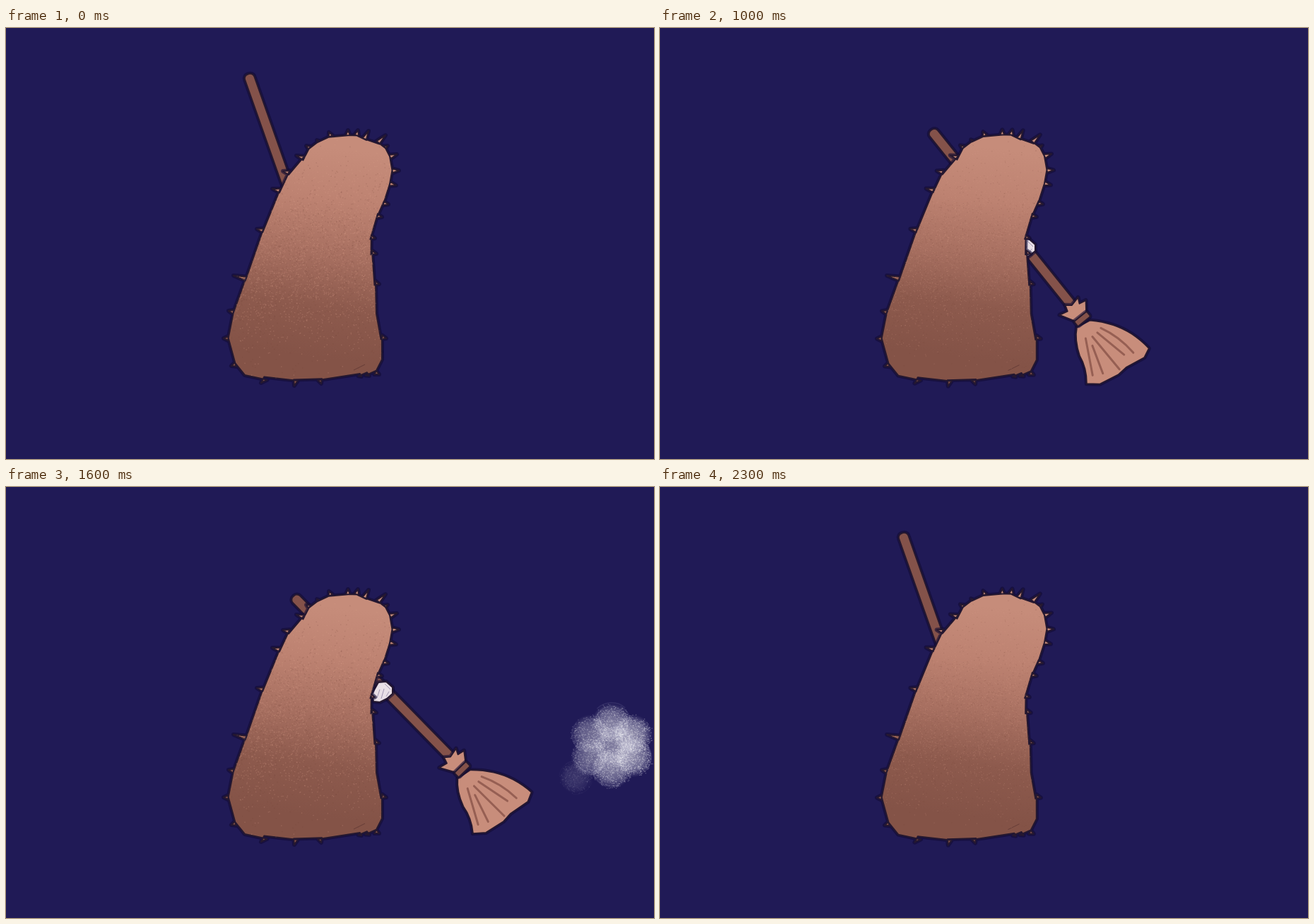
An HTML page with a canvas for the animation above (2.4 s loop, 917 by 611 pixels).

```html
<!DOCTYPE html>
<html lang="en">
<head>
<meta charset="utf-8">
<title>Sweeping broom</title>
<style>
html, body { margin: 0; width: 100%; height: 100%; overflow: hidden; background: #201a56; }
canvas { display: block; width: 100%; height: 100%; }
</style>
</head>
<body>
<canvas id="stage" width="917" height="611"></canvas>
<script>
const ctx = document.getElementById('stage').getContext('2d');
const LOOP = 2400, INK = '#25182f', HALO = 'rgba(18,11,52,.6)', WOOD = '#84524a', STRAW = '#c88d7b';

// Tufts clockwise around the fur: tip x, tip y, depth.
const tufts = [
  [392, 203, 9], [411, 181, 11], [425, 167, 5], [440, 159, 3], [457, 148, 6], [484, 145, 7],
  [498, 145, 7], [513, 146, 13], [537, 152, 15], [540, 167, 4], [553, 179, 10], [556, 202, 9],
  [552, 223, 9], [541, 250, 7], [532, 268, 7], [522, 298, 6], [524, 320, 7], [528, 363, 6],
  [524, 405, 0], [538, 440, 7], [532, 470, 0], [528, 491, 6], [514, 493, 5], [503, 494, 4],
  [446, 504, 6], [408, 507, 8], [361, 503, 9], [338, 492, 0], [319, 479, 6], [308, 440, 6],
  [315, 401, 7], [322, 351, 18], [355, 285, 9], [377, 228, 11]
];

// Each tuft is a thin wedge pointing away from the spine of the body.
function furOutline() {
  const path = new Path2D(), topX = 483, topY = 205, spineX = -58, spineY = 235;
  for (const [x, y, depth] of tufts) {
    const along = ((x - topX) * spineX + (y - topY) * spineY) / (spineX ** 2 + spineY ** 2);
    const part = Math.min(1, Math.max(0, along));
    const dx = topX + part * spineX - x, dy = topY + part * spineY - y;
    const length = Math.hypot(dx, dy), ux = dx / length, uy = dy / length;
    const baseX = x + ux * depth, baseY = y + uy * depth, half = Math.min(3, depth / 2);
    path.lineTo(baseX + uy * half, baseY - ux * half);
    path.lineTo(x, y);
    path.lineTo(baseX - uy * half, baseY + ux * half);
  }
  path.closePath();
  return path;
}
const bodyPath = furOutline();

// Broom parts, with the binding at 0,0 and the handle along the negative x axis.
const brush = new Path2D('M10 -7Q34 -32 62 -41Q78 -46 93 -47L99 -34L94 -5L95 10L89 39L77 53Q60 39 40 36Q18 28 6 14Z');
const collar = new Path2D('M0 9L-23 22L-20 10L-29 7L-23 0L-26 -14L-18 -10L-16 -20L0 -8Z');
const ribs = new Path2D('M28 -12Q54 -25 84 -26M30 -4L78 -14M30 5L90 4M40 13L80 26M26 14L73 39');

// Every pose: binding x, y, angle in degrees, and the hand when it shows.
const rest = [456, 387, 70.6], lift = [495, 404, 65], reach = [539, 411, 59.1],
  push = [597, 411, 51.3, 518, 313], sweep = [645, 399, 45.7, 534, 290],
  fling = [683, 374, 36.9, 540, 272];
const poses = [rest, rest, rest, lift, reach, push, sweep, fling, sweep, push, lift, rest];

// Dust cloud: time, center x, y, ring radii, opacity, lean of the dense side to the right.
const dust = [
  [1100, 690, 477, 9, 6, .4, 0],
  [1200, 738, 468, 27, 16, .85, -.45],
  [1400, 815, 393, 42, 38, .85, 0],
  [1600, 857, 367, 34, 32, .6, .2],
  [1800, 862, 342, 20, 22, .5, .75],
  [2300, 875, 325, 8, 8, 0, .7]
];

function randomFrom(seed) {
  return () => {
    seed = seed + 0x6D2B79F5 | 0;
    let n = Math.imul(seed ^ seed >>> 15, 1 | seed);
    n = n + Math.imul(n ^ n >>> 7, 61 | n) ^ n;
    return ((n ^ n >>> 14) >>> 0) / 4294967296;
  };
}

function inked(path, fill) {
  ctx.lineJoin = 'round';
  ctx.strokeStyle = HALO;
  ctx.lineWidth = 6;
  ctx.stroke(path);
  ctx.fillStyle = fill;
  ctx.fill(path);
  ctx.strokeStyle = INK;
  ctx.lineWidth = 2;
  ctx.stroke(path);
}

function drawBody(alternate) {
  const random = randomFrom(alternate ? 31 : 7);
  ctx.save();
  if (alternate) {
    ctx.translate(431, 325);
    ctx.scale(1.008, 1.004);
    ctx.translate(-431, -325);
  }
  const fur = ctx.createLinearGradient(462, 170, 425, 465);
  ['#c68c7a', '#bd8271', '#a87061', '#8d5a4d', '#845347'].forEach((color, i) => fur.addColorStop(i / 4, color));
  inked(bodyPath, fur);
  ctx.clip(bodyPath);
  const size = alternate ? 1.1 : 1.4;
  for (let i = 0; i < 4200; i++) {
    const x = 310 + random() * 240;
    const y = 325 + (random() + random() + random() - 1.5) * 125;
    ctx.fillStyle = random() < .6 ? 'rgba(222,164,143,.24)' : 'rgba(112,66,57,.18)';
    ctx.fillRect(x, y, size, size);
  }
  ctx.strokeStyle = 'rgba(80,45,45,.6)';
  ctx.lineWidth = 1;
  ctx.stroke(new Path2D('M492 485L508 477'));
  ctx.restore();
}

function drawBroom([x, y, degrees]) {
  ctx.save();
  ctx.translate(x, y);
  ctx.rotate(degrees * Math.PI / 180);
  const handle = new Path2D();
  handle.roundRect(-341, -7, 325, 14, 6);
  inked(handle, WOOD);
  inked(brush, STRAW);
  ctx.strokeStyle = '#965f53';
  ctx.lineWidth = 3;
  ctx.lineCap = 'round';
  ctx.stroke(ribs);
  inked(collar, STRAW);
  const binding = new Path2D();
  binding.roundRect(-3, -11, 9, 23, 2);
  inked(binding, WOOD);
  ctx.restore();
}

function drawHand(x, y) {
  ctx.save();
  ctx.translate(x, y);
  inked(new Path2D('M-7 -13L4 -14L13 -6L13 3L5 10L-5 15L-14 14L-16 3Z'), '#e9dfe6');
  ctx.strokeStyle = 'rgba(90,76,125,.5)';
  ctx.lineWidth = 1;
  ctx.stroke(new Path2D('M-9 9L-5 -3M-3 10L1 -4M2 -11L10 -3M4 7L8 0'));
  ctx.restore();
}

function drawPuff(x, y, r, opacity, random) {
  const glow = ctx.createRadialGradient(x, y, 0, x, y, r);
  glow.addColorStop(0, `rgba(255,255,255,${opacity * .75})`);
  glow.addColorStop(.6, `rgba(250,250,255,${opacity * .5})`);
  glow.addColorStop(1, 'rgba(245,245,255,0)');
  ctx.fillStyle = glow;
  ctx.fillRect(x - r, y - r, 2 * r, 2 * r);
  ctx.fillStyle = `rgba(255,255,255,${opacity * .45})`;
  for (let i = 0; i < r * r * .6; i++) {
    const angle = random() * 2 * Math.PI;
    const reach = r * Math.sqrt(random()) * (.8 + .25 * random());
    ctx.fillRect(x + reach * Math.cos(angle), y + reach * Math.sin(angle), 1.2, 1.2);
  }
  ctx.strokeStyle = `rgba(235,235,255,${opacity * .16})`;
  ctx.lineWidth = 1.5;
  for (let i = 0; i < 5; i++) {
    const start = random() * 2 * Math.PI;
    ctx.beginPath();
    ctx.arc(x, y, r * (.75 + .3 * random()), start, start + 1.5);
    ctx.stroke();
  }
}

function drawDust(time) {
  const next = dust.findIndex(([at]) => at > time);
  if (next < 1) return;
  const before = dust[next - 1], after = dust[next];
  const part = (time - before[0]) / (after[0] - before[0]);
  const [, x, y, rx, ry, opacity, lean] = before.map((value, i) => value + (after[i] - value) * part);
  const random = randomFrom(time), r = (rx + ry) * .43;
  drawPuff(x - 1.5 * rx, y + 1.4 * ry, r * .8, opacity * .35 * (1 - lean), random);
  for (let i = 0; i < 6; i++) {
    const angle = (i + .5) * Math.PI / 3;
    const side = Math.cos(angle);
    drawPuff(x + rx * side, y + ry * Math.sin(angle), r, opacity * (1 + lean * side), random);
  }
  drawPuff(x + lean * rx * .5, y, r * 1.1, opacity, random);
}

function draw(time) {
  const beat = Math.floor(time / 200);
  const pose = poses[beat];
  ctx.fillStyle = '#201a56';
  ctx.fillRect(0, 0, 917, 611);
  drawBroom(pose);
  if (pose.length > 3) drawHand(pose[3], pose[4]);
  drawBody(beat % 2 === 1);
  drawDust(time);
}

let shown = -1;
const start = performance.now();
function tick() {
  const time = Math.floor((performance.now() - start) % LOOP / 100) * 100;
  if (time !== shown) draw(shown = time);
  requestAnimationFrame(tick);
}
tick();
</script>
</body>
</html>
```
